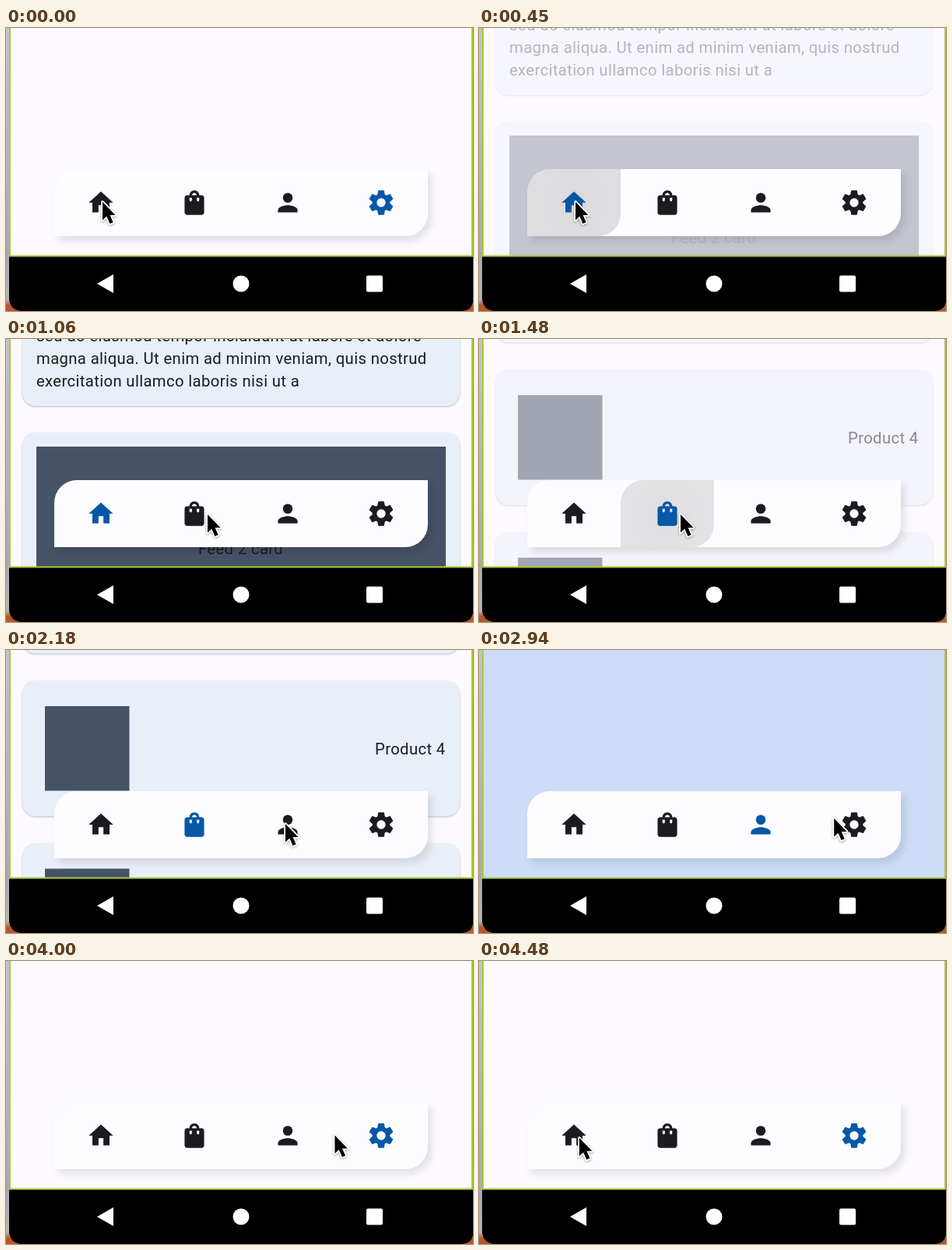
An HTML page for the animation above (4.51 s loop, 600 by 363 pixels).

```html
<!DOCTYPE html>
<html lang="en">
<head>
<meta charset="utf-8">
<title>Bottom navigation</title>
<style>
  html, body { margin: 0; width: 100%; height: 100%; overflow: hidden; background: #fcf9ff; }
  svg { display: block; width: 600px; height: 363px; }
  text { font: 20.3px Roboto, sans-serif; letter-spacing: .3625px; fill: #1a1c1f; }
  .card { fill: #e9eff9; filter: drop-shadow(0 1.5px 1px rgba(20, 30, 50, .28)); }
  .image { fill: #465366; }
  .bar { fill: #fdfcfe; filter: drop-shadow(5px 6px 5px rgba(0, 0, 0, .1)); }
  .edge { fill: none; stroke: #a9cc33; stroke-width: 2; }
</style>
</head>
<body>
<svg viewBox="0 0 600 363">
  <defs>
    <clipPath id="screen"><rect x="5" width="593" height="292"/></clipPath>
    <clipPath id="tile"><path d="M0 86V29A29 29 0 0 1 29 0H120V57A29 29 0 0 1 91 86Z"/></clipPath>
    <radialGradient id="glow">
      <stop offset="0" stop-opacity=".1"/>
      <stop offset=".4" stop-opacity=".08"/>
      <stop offset="1" stop-opacity="0"/>
    </radialGradient>
    <linearGradient id="frame" x2="0" y2="1">
      <stop offset="0" stop-color="#c3c3ca"/>
      <stop offset=".8" stop-color="#aaa9b0"/>
      <stop offset=".96" stop-color="#b9b3b2"/>
      <stop offset=".98" stop-color="#b8552a"/>
    </linearGradient>
  </defs>

  <rect width="600" height="363" fill="url(#frame)"/>
  <rect x="4" width="596" height="293" fill="#fcf9ff"/>

  <g clip-path="url(#screen)">
    <g class="page">
      <rect class="card" x="21" y="-300" width="562" height="386" rx="17"/>
      <rect class="card" x="21" y="120" width="562" height="400" rx="17"/>
      <rect class="image" x="39" y="138" width="526" height="260"/>
      <text x="39" y="3">sed do eiusmod tempor incididunt ut labore et dolore</text>
      <text x="39" y="32">magna aliqua. Ut enim ad minim veniam, quis nostrud</text>
      <text x="39" y="61">exercitation ullamco laboris nisi ut a</text>
      <text x="247" y="276">Feed 2 card</text>
    </g>
    <g class="page" id="products"></g>
    <g class="page"><rect width="600" height="293" fill="#cdddf7"/></g>
    <g class="page"></g>
  </g>

  <path class="edge" d="M5 0V292.5H599V0"/>
  <path class="bar" d="M62 267V210A29 29 0 0 1 91 181H542V238A29 29 0 0 1 513 267Z"/>
  <g id="tabs"></g>

  <path d="M4 293.5H600V352Q597 363 586 363H18Q6 361 4 349Z"/>
  <g fill="#fff">
    <path d="M117 328L138 316V340Z"/>
    <circle cx="302" cy="328" r="10.5"/>
    <rect x="463" y="317.5" width="21" height="21" rx="2"/>
  </g>

  <path id="cursor" d="M2 4V27.5L7.3 22.6L11.4 32L15.6 30.2L11.6 21H18.5Z"
    stroke="#fff" stroke-width="3.4" paint-order="stroke" stroke-linejoin="round"
    style="filter: drop-shadow(0 1.5px 1.5px rgba(0,0,0,.35))"/>
</svg>

<script>
const LOOP = 4510, FADE = 450;
const $ = s => document.querySelector(s);
const clamp = v => Math.min(1, Math.max(0, v));

// One entry per tab: press, release, end of the ink, in ms
const taps = [
  { press: 90, tap: 310, end: 1000 },
  { press: 1100, tap: 1255, end: 1930 },
  { press: 2230, tap: 2390, end: 2750 },
  { press: 3480, tap: 3670, end: 3930 }
];

const tooth = a => `<path transform="rotate(${a} 12 12)" d="M10 2.5H14L14.6 6H9.4Z"
  stroke="currentColor" stroke-linejoin="round"/>`;
const icons = [
  '<path d="M10 20v-6h4v6h5v-8h3L12 3 2 12h3v8z"/>',
  `<path d="M18 6h-2c0-2.21-1.79-4-4-4S8 3.79 8 6H6c-1.1 0-2 .9-2 2v12c0 1.1.9 2 2 2h12c1.1 0 2-.9 2-2V8c0-1.1-.9-2-2-2z
    m-8 4c0 .55-.45 1-1 1s-1-.45-1-1V8h2v2zm2-6c1.1 0 2 .9 2 2h-4c0-1.1.9-2 2-2zm4 6c0 .55-.45 1-1 1s-1-.45-1-1V8h2v2z"/>`,
  `<circle cx="12" cy="8" r="4"/><path d="M12 14c-2.67 0-8 1.34-8 4v2h16v-2c0-2.66-5.33-4-8-4z"/>`,
  `<circle cx="12" cy="12" r="5.4" fill="none" stroke="currentColor" stroke-width="3.6"/>` +
    [0, 60, 120, 180, 240, 300].map(tooth).join('')
];

$('#products').innerHTML = [3, 4, 5].map(n => {
  const y = 39.5 + (n - 4) * 208.5;
  return `<rect class="card" x="21" y="${y}" width="562" height="173.5" rx="17"/>
    <rect class="image" x="50" y="${y + 32.5}" width="108.5" height="108.5"/>
    <text x="474" y="${y + 94.5}">Product ${n}</text>`;
}).join('');

$('#tabs').innerHTML = icons.map((icon, i) => `
  <g transform="translate(${62 + i * 120} 181)">
    <g class="ink" clip-path="url(#tile)">
      <rect width="120" height="86" fill-opacity=".08"/>
      <circle cx="60" cy="43" fill="url(#glow)"/>
    </g>
    <g class="icon" fill="currentColor" transform="translate(60 43) scale(1.57) translate(-12 -12)">${icon}</g>
  </g>`).join('');

const pages = document.querySelectorAll('.page');
const inks = document.querySelectorAll('.ink');
const tabs = document.querySelectorAll('.icon');

const ease = {
  in: p => p * (.6 + .4 * p),
  out: p => 1 - (1 - p) ** 2,
  both: p => p * p * (3 - 2 * p),
  line: p => p
};

// time, x, y, easing towards this point
const path = [
  [0, 122, 219], [580, 122, 219, 'line'], [670, 186, 219, 'in'],
  [960, 257, 221, 'out'], [1720, 257, 221, 'line'], [2150, 357, 219, 'both'],
  [2740, 357, 219, 'line'], [2940, 454, 212, 'in'], [3240, 481, 218, 'out'],
  [3870, 481, 218, 'line'], [4370, 153, 226, 'in'], [4480, 127, 223, 'out'],
  [LOOP, 122, 219, 'line']
];

function cursorAt(t) {
  const i = path.findIndex((p, k) => k && t <= p[0]);
  const [t0, x0, y0] = path[i - 1], [t1, x1, y1, e] = path[i];
  const p = ease[e]((t - t0) / (t1 - t0));
  return [x0 + (x1 - x0) * p, y0 + (y1 - y0) * p];
}

function render(t) {
  let active = taps.length - 1;
  taps.forEach((s, i) => { if (t >= s.tap) active = i; });
  if (t < taps[0].tap) active = taps.length - 1;

  taps.forEach(({ press, tap, end }, i) => {
    const on = i === active;
    pages[i].style.opacity = on ? clamp((t - tap) / FADE) : 0;
    tabs[i].style.color = on ? '#0458a6' : '#1c1b20';
    const shown = clamp((t - press) / 100) * clamp((end - t) / (end - tap));
    inks[i].style.opacity = shown;
    inks[i].lastElementChild.setAttribute('r', Math.max(0, (t - press) * .48));
  });

  $('#cursor').setAttribute('transform', `translate(${cursorAt(t).join(' ')})`);
}

const start = performance.now();
function tick(now) {
  render(Math.max(0, now - start) % LOOP);
  requestAnimationFrame(tick);
}
render(0);
requestAnimationFrame(tick);
</script>
</body>
</html>
```
